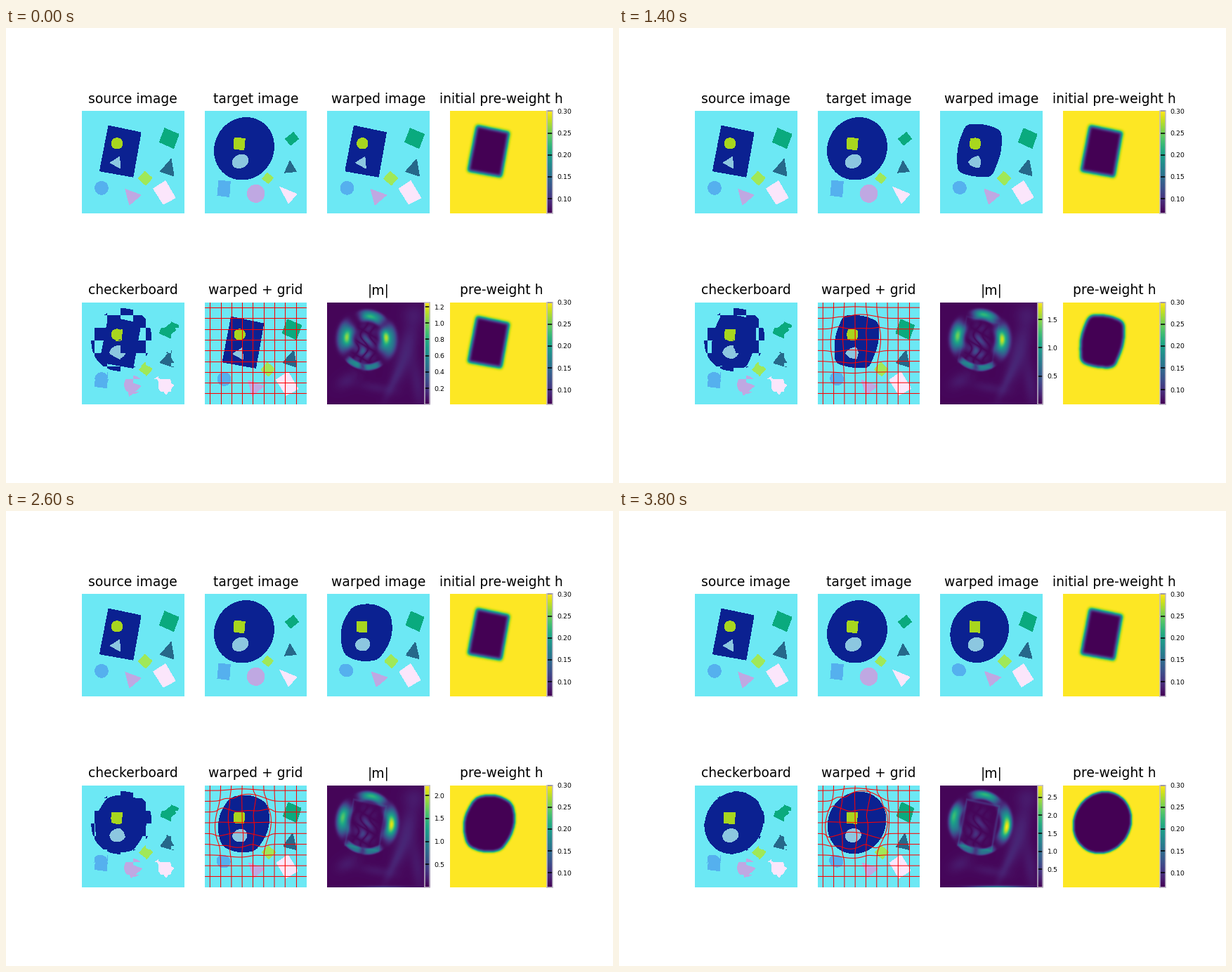
A matplotlib script that plays this animation: 864x648 px, repeating every 4000 ms.

```python
import numpy as np
import matplotlib.pyplot as plt
from matplotlib.animation import FuncAnimation
from matplotlib.patches import Polygon, Rectangle
from matplotlib.path import Path

FRAMES, STEP = 20, 200
S = 145.57          # panel side in pixels
N = 146             # field resolution
SKY, NAVY = "#6ce8f4", "#0b2191"
ANGLES = np.radians(np.arange(360))
RAYS = np.array([np.cos(ANGLES), np.sin(ANGLES)])
POLE = np.array([55.5, 55.5])

plt.rcParams["font.family"] = "DejaVu Sans"


def poly(*xy):
    return np.array(xy, float).reshape(-1, 2)


def ell(cx, cy, rx, ry, tilt=0):
    a, r = np.radians(np.arange(0, 360, 5)), np.radians(tilt)
    x, y = rx * np.cos(a), ry * np.sin(a)
    return np.column_stack([cx + x * np.cos(r) - y * np.sin(r),
                            cy + x * np.sin(r) + y * np.cos(r)])


COLORS = [NAVY, "#a8d61e", "#8cc7e0", "#0aaa7e", "#26688a",
          "#a0e858", "#55b0ee", "#bfa8e2", "#fbe6fb"]
SOURCE = [
    poly(38, 20.8, 84, 30.5, 72.8, 93.7, 25.5, 85.3),
    ell(50, 46, 7.6, 7.6),
    poly(40.5, 73.5, 53.5, 65.2, 55, 81.5),
    poly(118, 24.6, 138, 33, 130.5, 53, 110.5, 44),
    poly(127, 68.5, 131, 92.5, 111.5, 86),
    poly(89.5, 86, 100, 95.3, 91, 105.5, 80.5, 96),
    ell(28, 109.5, 9.2, 9.2),
    poly(62, 111.5, 84, 119.5, 67.8, 133.5),
    poly(102, 110.5, 118.8, 99.5, 133, 123.5, 116, 132.5),
]
TARGET = [
    ell(56.3, 53.4, 45, 41.5, -60),
    poly(42.5, 37.7, 57.5, 39.2, 56, 55.6, 41.4, 53.4),
    ell(50.8, 71.5, 11.6, 9, -25),
    poly(126.5, 30.3, 133.7, 39.5, 122.5, 48.5, 115, 39.5),
    poly(121.5, 71, 130.5, 86, 114, 87.7),
    poly(89.3, 88.3, 97.5, 95, 91, 103, 82, 96.3),
    poly(20.3, 98.8, 36.5, 100.3, 35, 122, 18.3, 120),
    ell(72.9, 117.5, 12.1, 12.4),
    poly(107.3, 108.3, 130.9, 118, 119.5, 131.3),
]
WARPED = [
    ell(55.8, 53.5, 44.8, 40, -60),
    poly(42, 38.5, 56.6, 39.3, 56, 54.8, 41.8, 53.6),
    ell(50.6, 71.5, 11, 9.2, -18),
    poly(119.7, 24.6, 137, 32.8, 131, 53, 112.5, 44),
    poly(124.5, 68.5, 130.5, 91.8, 112, 87.5),
    poly(91, 86.5, 101, 95.3, 92, 105, 82, 95.5),
    ell(26.5, 108, 9.8, 8.2, 25),
    poly(63.5, 110.5, 86, 118.5, 71, 131),
    poly(103, 110.5, 118.5, 99.5, 132.3, 121.5, 115.5, 132),
]


def polar(pts, c):
    """Radius of a convex polygon around c, one value per degree."""
    edge = np.roll(pts, -1, 0) - pts
    normal = np.column_stack([edge[:, 1], -edge[:, 0]])
    dist = (normal * (pts - c)).sum(1)
    normal *= np.sign(dist)[:, None]
    return (np.abs(dist)[:, None] / np.maximum(normal @ RAYS, 1e-9)).min(0)


def soften(r):
    k = np.hanning(33)
    return np.convolve(np.tile(r, 3), k / k.sum(), "same")[360:720]


def outline(c, r):
    return c + (r * RAYS).T


BOX = polar(SOURCE[0], POLE)
BOX_SOFT = soften(BOX)
OVAL = polar(WARPED[0], POLE)
PAIRS = []
for a, b in zip(SOURCE[1:], WARPED[1:]):
    ca, cb = a.mean(0), b.mean(0)
    PAIRS.append((ca, polar(a, ca), cb, polar(b, cb)))


def body(t):
    s = min(1, 4 * t)
    start = (1 - s) * BOX + s * BOX_SOFT
    return (1 - t) * start + t * OVAL


def shapes(t):
    out = [outline(POLE, body(t))]
    for i, (ca, ra, cb, rb) in enumerate(PAIRS):
        s = min(1, 1.2 * t) if i < 2 else t
        out.append(outline(ca + s * (cb - ca), ra + s * (rb - ra)))
    return out


# Fields on the pixel grid
axis = (np.arange(N) + 0.5) * S / N
X, Y = np.meshgrid(axis, axis)


def around(x, y, c):
    dx, dy = x - c[0], y - c[1]
    return np.hypot(dx, dy), np.degrees(np.arctan2(dy, dx)) % 360


def radius_at(r, deg):
    return np.interp(deg, np.arange(361), np.append(r, r[0]))


DIST, DEG = around(X, Y, POLE)
EDGE0 = DIST - radius_at(BOX, DEG)
U, V = (X - 56) / 42.5, (Y - 53.3) / 44
RING, TURN = np.hypot(U, V), np.degrees(np.arctan2(V, U))


def weight(r, sigma):
    outside = (DIST > radius_at(r, DEG)).astype(float)
    k = np.exp(-((axis[:, None] - axis) / sigma) ** 2 / 2)
    k /= k.sum(1, keepdims=True)
    return k @ outside @ k.T


def lobe(deg, half, q, w, amp, power=4):
    d = (TURN - deg + 180) % 360 - 180
    return amp * np.exp(-np.abs(d / half) ** power - np.abs((RING - q) / w) ** power)


def blob(x, y, a, b, tilt, amp):
    r = np.radians(tilt)
    u = (X - x) * np.cos(r) + (Y - y) * np.sin(r)
    v = (Y - y) * np.cos(r) - (X - x) * np.sin(r)
    return amp * np.exp(-(u / a) ** 2 - (v / b) ** 2)


HAZE = (0.015 + blob(112, 70, 12, 42, 15, 0.08) + blob(95, 112, 6, 28, 25, 0.06)
        + blob(128, 115, 9, 35, -8, 0.05) + blob(122, 18, 16, 14, 0, 0.04)
        + blob(28, 112, 16, 10, -30, 0.05) + blob(70, 122, 25, 7, 10, 0.04))
SWIRL = (np.abs(np.sin(X / 4.2 + 1.3 * np.sin(Y / 6)) * np.cos(Y / 6.5 - X / 11))
         * blob(53, 64, 12, 23, 8, 1))


def momentum(t):
    def mix(a, b):
        return a + t * (b - a)

    f = HAZE + mix(0.32, 0.15) * SWIRL
    f = f + lobe(187, 35, mix(0.71, 0.84), mix(0.27, 0.19), 0.42)
    f = f + lobe(mix(186, 194), 20, mix(0.66, 0.88), 0.12, mix(0.4, 0.25), 2)
    f = f + lobe(3, 36, mix(0.72, 0.90), mix(0.28, 0.19), 0.42)
    f = f + lobe(mix(-5, 9), 20, mix(0.66, 0.92), 0.12, mix(0.45, 0.55), 2)
    f = f + lobe(-76, 30, mix(0.77, 0.89), mix(0.18, 0.14), 0.42)
    f = f + lobe(mix(-80, -78), 18, mix(0.75, 0.92), 0.09, 0.22, 2)
    f = f + lobe(118, 17, mix(0.88, 0.95), 0.10, mix(0.42, 0.36))
    f = f + lobe(78, 18, mix(0.90, 0.96), 0.10, mix(0.42, 0.36))
    f = f + 0.1 * t * np.exp(-(EDGE0 / 2) ** 2)
    return f + blob(80, S, 36, 2.2, 0, 0.45 * t ** 3)


PEAK_AT = [0, 3, 7, 11, 15, 17, 19]
PEAKS = [1.256, 1.55, 1.804, 2.057, 2.385, 2.58, 2.832]

# Grid lines carried along with the shape
marks = 7.64 + 15.285 * np.arange(9)
run = np.linspace(0, S, 150)
GRID = ([np.column_stack([np.full_like(run, m), run]) for m in marks]
        + [np.column_stack([run, np.full_like(run, m)]) for m in marks])


def carry(pts, t):
    r, deg = around(pts[:, 0], pts[:, 1], POLE)
    r0 = radius_at(BOX_SOFT, deg)
    push = t * radius_at(OVAL - BOX_SOFT, deg)
    push *= np.where(r < r0, (r / r0) ** 3, np.exp(-((r - r0) / 14) ** 2))
    out = pts + (pts - POLE) * (push / np.maximum(r, 1))[:, None]
    d = pts - (49, 73)
    return out + 0.65 * t * d * np.exp(-(d ** 2).sum(1) / 110)[:, None]


# Figure
fig, axes = plt.subplots(2, 4, figsize=(6.4, 4.8), dpi=135)
fig.subplots_adjust(left=0.125, right=0.9, bottom=0.11, top=0.88,
                    wspace=0.2, hspace=0.2)
TITLES = ["source image", "target image", "warped image", "initial pre-weight h",
          "checkerboard", "warped + grid", "|m|", "pre-weight h"]
for ax, name in zip(axes.flat, TITLES):
    ax.set(xlim=(0, S), ylim=(S, 0), aspect="equal")
    ax.axis("off")
    ax.set_title(name, fontsize=10, y=1.0, pad=6)
src, tgt, wrp, h0, chk, grd, mom, h1 = axes.flat


def backdrop(ax):
    ax.add_patch(Rectangle((0, 0), S, S, fc=SKY, ec="none"))


def scene(ax, polys, clip=None):
    out = []
    for pts, color in zip(polys, COLORS):
        p = ax.add_patch(Polygon(pts, fc=color, ec="none", aa=False))
        if clip is not None:
            p.set_clip_path(clip, ax.transData)
        out.append(p)
    return out


def heat(ax, data, lo, hi):
    im = ax.imshow(data, cmap="viridis", vmin=0, vmax=1, extent=(0, S, S, 0),
                   interpolation="nearest")
    bar = ax.inset_axes([0.95, 0, 0.05, 1])
    ramp = bar.imshow(np.linspace(0, 1, 256)[:, None], cmap="viridis",
                      aspect="auto", origin="lower", extent=(0, 1, lo, hi))
    bar.set_xticks([])
    bar.yaxis.tick_right()
    bar.tick_params(axis="y", direction="in", labelsize=5, length=3.5,
                    width=0.8, pad=3.5)
    bar.spines[:].set_color("#c0bac8")
    bar.spines[:].set_linewidth(0.8)
    return im, bar, ramp


for ax in (src, tgt, wrp, chk, grd):
    backdrop(ax)
scene(src, SOURCE)
scene(tgt, TARGET)
scene(chk, TARGET)

cell = S / 8
tiles = [(c * cell, r * cell) for r in range(8) for c in range(8) if (r + c) % 2 == 0]
for xy in tiles:
    chk.add_patch(Rectangle(xy, cell, cell, fc=SKY, ec="none", aa=False))
square = Path.unit_rectangle().vertices * cell
codes = Path.unit_rectangle().codes
board = Path(np.vstack([square + xy for xy in tiles]), np.tile(codes, len(tiles)))

start = shapes(0)
moving = [scene(wrp, start), scene(chk, start, board), scene(grd, start)]
lines = [grd.plot(*g.T, color="red", lw=0.55)[0] for g in GRID]
heat(h0, weight(BOX, 2.4), 0.0667, 0.3)
m_im, m_bar, m_ramp = heat(mom, momentum(0), 0.002, PEAKS[0])
h_im, _, _ = heat(h1, weight(BOX, 2.4), 0.0667, 0.3)


def update(k):
    t = k / (FRAMES - 1)
    now = shapes(t)
    for group in moving:
        for p, pts in zip(group, now):
            p.set_xy(pts)
    for line, pts in zip(lines, GRID):
        line.set_data(*carry(pts, t).T)
    m_im.set_data(np.clip(momentum(t), 0, 1))
    peak = np.interp(k, PEAK_AT, PEAKS)
    m_ramp.set_extent((0, 1, 0.002, peak))
    m_bar.set_ylim(0.002, peak)
    h_im.set_data(weight(body(t), 2.4 - 0.8 * t))


anim = FuncAnimation(fig, update, frames=FRAMES, interval=STEP,
                     repeat=True, repeat_delay=0)
plt.show()
```
